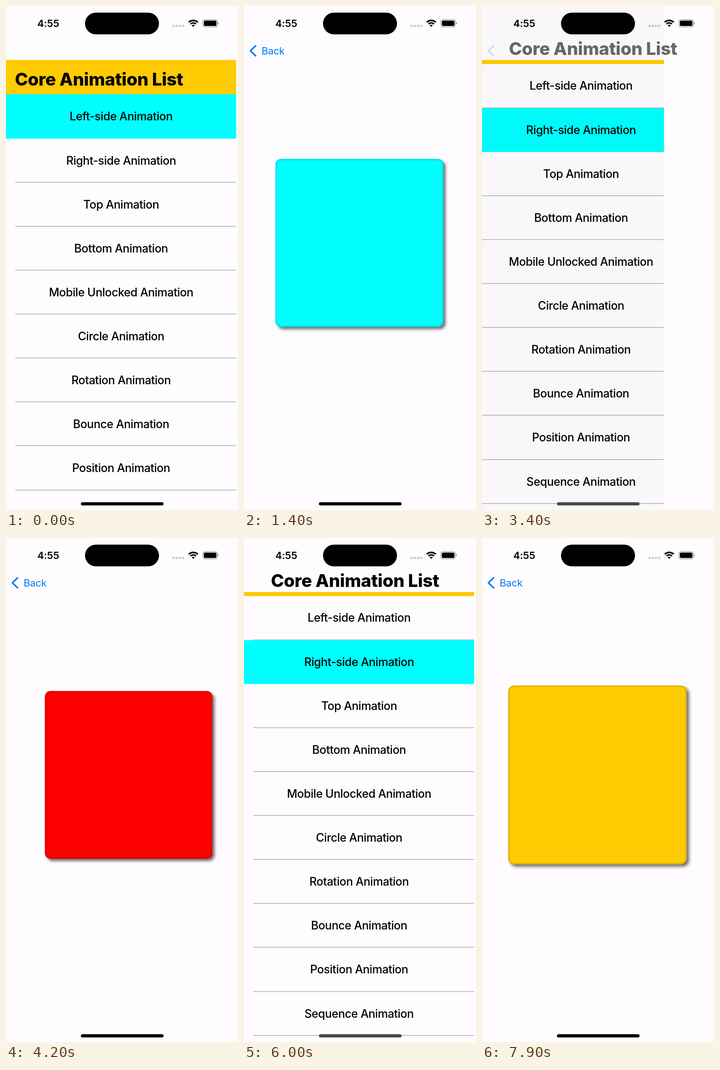
These frames come from a looping animation (508x1102 px, 8 s). An HTML page:

```html
<!DOCTYPE html>
<html lang="en">
<head>
<meta charset="utf-8">
<title>Core Animation List</title>
<style>
  html, body { margin: 0; width: 100%; height: 100%; overflow: hidden; background: #fefcff; }
  body { position: relative; font-family: Inter, "Open Sans", sans-serif; color: #000; }
  div, svg { position: absolute; }
  #list { left: 0; top: 0; width: 504px; height: 1097px; overflow: hidden; }
  #header { left: 0; top: 118px; width: 504px; background: #ffcb02; }
  #rows { left: 0; top: 193.4px; width: 504px; }
  .row { left: 0; width: 504px; height: 96.13px; line-height: 96.13px; text-align: center;
         font-size: 25px; font-weight: 500; letter-spacing: -.45px; white-space: nowrap; }
  .row::after { content: ""; position: absolute; left: 20px; right: 0; bottom: 0; height: 1px; background: #88888c; }
  .row.on { background: #0ff; }
  .row.on::after { display: none; }
  #dim { left: 0; top: 0; width: 504px; height: 1102px; background: #000; }
  #page { left: 0; top: 0; width: 508px; height: 1102px; overflow: hidden; background: #fefcff; }
  #box { left: -195.5px; top: -195.5px; width: 391px; height: 391px; border-radius: 13px;
         box-shadow: inset 0 0 0 3.5px rgba(0,0,0,.1), 5px 5px 7px rgba(0,0,0,.58); }
  #title { left: 0; top: 0; height: 50px; line-height: 50px; font-size: 38.5px; font-weight: 800;
           letter-spacing: -.3px; white-space: nowrap; }
  #back { left: 38.5px; top: 83px; line-height: 30px; font-size: 22px; letter-spacing: -.3px; color: #007af0; }
  #time { left: 52px; top: 23px; width: 81px; line-height: 30px; text-align: center;
          font-size: 22px; font-weight: 600; letter-spacing: -.2px; }
  svg { left: 0; top: 0; }
  #home { left: 164px; top: 1085px; width: 181px; height: 6.5px; border-radius: 4px; }
</style>
</head>
<body>
<div id="list">
  <div id="header"></div>
  <div id="rows"></div>
</div>
<div id="dim"></div>
<div id="page"><div id="box"></div></div>
<div id="title">Core Animation List</div>
<div id="back">Back</div>
<div id="time">4:55</div>
<svg width="508" height="130" fill="none">
  <path id="chevron" d="M25.5 87L14 98L25.5 109" stroke="#007af0" stroke-width="3.2" stroke-linecap="round" stroke-linejoin="round"/>
  <rect x="173" y="14.5" width="162" height="47.5" rx="23.7" fill="#000"/>
  <path d="M364.5 43.5h26" stroke="#000" stroke-opacity=".2" stroke-width="4.5" stroke-dasharray="4.7 2.3"/>
  <path d="M400.1 35.6A14 14 0 0 1 419.9 35.6M403.9 39.4A8.6 8.6 0 0 1 416.1 39.4" stroke="#000" stroke-width="3.3"/>
  <path d="M410 45.8L406.6 42.3A4.8 4.8 0 0 1 413.4 42.3Z" fill="#000"/>
  <rect x="431" y="29.5" width="32" height="16.5" rx="5" stroke="#000" stroke-opacity=".45" stroke-width="1.2"/>
  <rect x="433.2" y="31.7" width="27.6" height="12.1" rx="3" fill="#000"/>
  <path d="M464.2 35.2Q466 36 466 37.8T464.2 40.4Z" fill="#000" fill-opacity=".5"/>
</svg>
<div id="home"></div>
<script>
const LOOP = 8000, WIDTH = 504, COLLAPSE = 66.7, MID = 517.5;
const $ = id => document.getElementById(id);
const names = ["Left-side", "Right-side", "Top", "Bottom", "Mobile Unlocked",
               "Circle", "Rotation", "Bounce", "Position", "Sequence"];
const rows = names.map((name, i) => {
  const row = document.createElement("div");
  row.className = "row";
  row.textContent = name + " Animation";
  row.style.top = i * 96.13 + "px";
  $("rows").append(row);
  return row;
});

// Spans in which the screen updates, ten times a second; it rests in between.
const spans = [[0, 0], [500, 1200], [1400, 1400], [2100, 2800], [3200, 3200], [3400, 4000],
               [4200, 4200], [4500, 5200], [5400, 6000], [6500, 6500], [6800, 6800],
               [7100, 7300], [7500, 7900]];
// Navigation: start time, 1 = push, 0 = pop.
const moves = [[450, 1], [2050, 0], [3350, 1], [5450, 0], [6260, 1]];
// Box pose: time, centre x, centre y, scale.
const poses = [
  [0, -198, MID, 1], [1000, -198, MID, 1], [1100, -40, MID, 1], [1200, 140, MID, .99],
  [1400, 252.2, MID, .94], [2800, 252.2, MID, .94],
  [3400, 705, MID, 1], [4000, 705, MID, 1], [4200, 268, MID, .938], [4500, 256, MID, .91],
  [4700, 252.2, MID, .97], [4900, 252.2, MID, 1.06], [5000, 252.2, MID, 1.045],
  [5200, 252.2, MID, 1], [6000, 252.2, MID, 1],
  [6500, 252.2, -210, 1], [6800, 252.2, -210, 1], [7100, 252.5, 74, .991], [7200, 252.2, 400, .95],
  [7300, 252.2, MID, 1.1], [7500, 252.2, MID, 1.07], [7700, 252.2, MID, 1.02], [7900, 252.2, MID, 1]
];

const lastBefore = (list, t) => list.filter(item => item[0] <= t).pop();

function snap(t) {
  return Math.min(Math.floor(t / 100) * 100, lastBefore(spans, t)[1]);
}

function spring(ms) {
  const x = ms * .017, p = 1 - (1 + x) * Math.exp(-x);
  return p > .995 ? 1 : p;
}

function pageShown(t) {
  const move = lastBefore(moves, t);
  if (!move) return 0;
  const p = spring(t - move[0]);
  return move[1] ? p : 1 - p;
}

function poseAt(t) {
  const a = lastBefore(poses, t), b = poses[poses.indexOf(a) + 1] || a;
  const k = a === b ? 0 : (t - a[0]) / (b[0] - a[0]);
  return a.slice(1).map((v, i) => v + (b[i + 1] - v) * k);
}

const place = (id, x, y, scale = 1) =>
  $(id).style.transform = `translate(${x}px, ${y}px) scale(${scale})`;
const fade = (id, a) => $(id).style.opacity = Math.max(0, Math.min(1, a));

function draw(now) {
  const t = snap(now % LOOP), d = pageShown(t);
  const large = t < 1200, lift = large ? COLLAPSE * d : COLLAPSE;
  const chosen = t < 3200 ? 0 : t < 6500 ? 1 : 2;

  place("list", -d * WIDTH / 3, 0);
  $("header").style.height = 75.4 - lift + "px";
  place("rows", 0, -lift);
  rows.forEach((row, i) => row.classList.toggle("on", i === chosen));
  fade("dim", d * .1);

  place("page", (1 - d) * WIDTH, 0);
  $("page").style.visibility = d > 0 ? "visible" : "hidden";
  $("box").style.backgroundColor = t < 3300 ? "#0ff" : t < 6300 ? "#f00" : "#ffcb02";
  place("box", ...poseAt(t));

  place("title", large ? 19.5 : 59, 134.5 - lift);
  fade("title", 1 - 2 * d);
  place("back", (1 - d) * 50, 0);
  fade("back", 2 * d - 1);
  fade("chevron", d);
  $("home").style.background = !large && d < .5 ? "#47494b" : "#000";
}

const start = performance.now();
function tick() {
  draw(performance.now() - start);
  requestAnimationFrame(tick);
}
tick();
</script>
</body>
</html>
```
